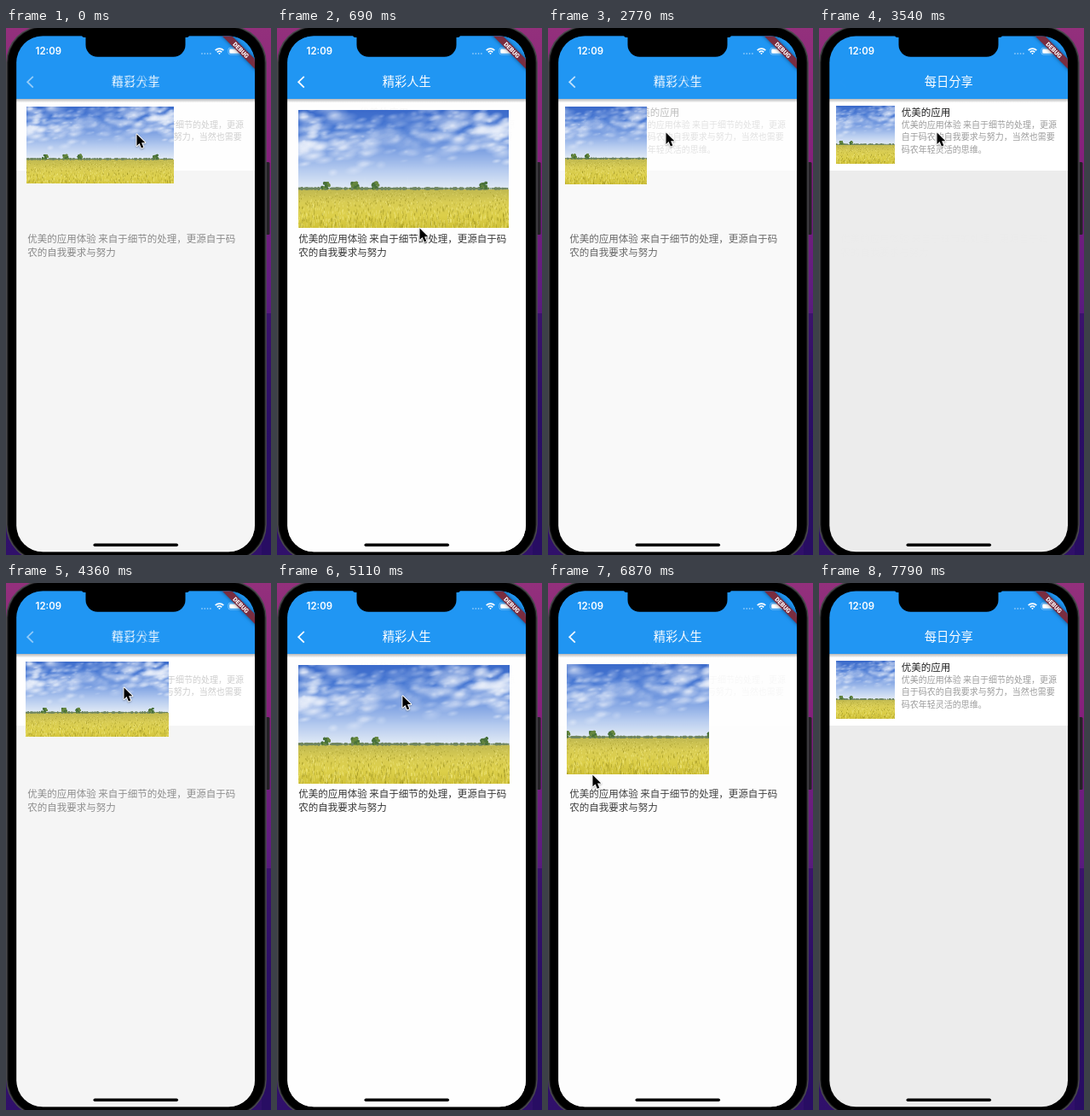
Write an HTML page with a canvas that moves like this. It is 311 by 617 pixels and loops after 8 s.

```html
<!DOCTYPE html>
<html lang="zh-CN">
<head>
<meta charset="utf-8">
<title>每日分享</title>
<style>
html, body { margin: 0; width: 100%; height: 100%; overflow: hidden; background: #000; }
canvas { display: block; width: 311px; height: 617px; }
</style>
</head>
<body>
<canvas id="stage"></canvas>
<script>
const W = 311, H = 617, LOOP = 8000;
const SCALE = window.devicePixelRatio || 1;
const FONT = '"Noto Sans CJK SC", "Noto Sans CJK", sans-serif';
const PHOTO = { w: 252, h: 143 };

// Hero bounds as corner points: top-left, bottom-right.
const THUMB = [[19.5, 90.6], [88.5, 159]];
const LARGE = [[25.3, 96], [277, 238.8]];

// Start and duration of each route change; opening and closing alternate.
const FLIGHTS = [[-600, 1660], [1736, 1900], [3780, 1660], [6420, 1400]];

// Pointer stops: arrival time, x, y. Every move takes TRAVEL ms.
const TRAVEL = 650;
const STOPS = [
  [0, 153, 124], [690, 167, 234], [1800, 38, 72], [2770, 138, 122],
  [5600, 196, 186], [6500, 38, 72], [7300, 90, 640]
];

const clamp = v => Math.min(1, Math.max(0, v));

function random(seed) {
  return () => (seed = (seed * 16807) % 2147483647) / 2147483647;
}

function layer(w, h, k, draw) {
  const canvas = document.createElement('canvas');
  canvas.width = Math.round(w * k);
  canvas.height = Math.round(h * k);
  const g = canvas.getContext('2d');
  g.scale(k, k);
  draw(g);
  return canvas;
}

function box(g, x, y, w, h, r, fill) {
  g.beginPath();
  g.roundRect(x, y, w, h, r);
  g.fillStyle = fill;
  g.fill();
}

function dot(g, x, y, r, fill) {
  g.beginPath();
  g.arc(x, y, r, 0, 7);
  g.fillStyle = fill;
  g.fill();
}

function text(g, str, x, y, size, fill, align = 'left', weight = 400, font = FONT) {
  g.font = `${weight} ${size}px ${font}`;
  g.textAlign = align;
  g.fillStyle = fill;
  g.fillText(str, x, y);
}

// Vertical gradient with evenly spaced colours.
function gradient(g, y0, y1, ...colors) {
  const fill = g.createLinearGradient(0, y0, 0, y1);
  colors.forEach((color, i) => fill.addColorStop(i / (colors.length - 1), color));
  return fill;
}

function puff(g, x, y, r, stretch, alpha) {
  const fill = g.createRadialGradient(0, 0, 0, 0, 0, r);
  fill.addColorStop(0, `rgba(244,247,253,${alpha})`);
  fill.addColorStop(1, 'rgba(244,247,253,0)');
  g.save();
  g.translate(x, y);
  g.rotate(-0.18);
  g.scale(stretch, 1);
  g.fillStyle = fill;
  g.fillRect(-r, -r, r * 2, r * 2);
  g.restore();
}

function drawPhoto(g) {
  const { w, h } = PHOTO, rnd = random(41), horizon = 96;
  g.fillStyle = gradient(g, 0, horizon, '#3b6aca', '#4a7ad4', '#7ca0e2', '#b4caef', '#e4ecf6');
  g.fillRect(0, 0, w, horizon);

  // Clouds gather in a wavy band, denser towards both sides.
  for (let i = 0; i < 260; i++) {
    const x = rnd() * w, spread = rnd() + rnd() + rnd() - 1.5;
    const y = 32 + 8 * Math.sin(x / 38) + spread * 32;
    const side = Math.abs(2 * x / w - 1);
    puff(g, x, y, 2 + rnd() * 6, 1.3 + rnd() * 1.7, 0.18 + 0.4 * side);
  }

  g.fillStyle = gradient(g, horizon, h, '#c0b951', '#d9cd54', '#dccf4a', '#cfc138');
  g.fillRect(0, horizon, w, h - horizon);
  for (let i = 0; i < 1300; i++) {
    const depth = rnd();
    g.fillStyle = rnd() < 0.5 ? 'rgba(246,237,140,.5)' : 'rgba(140,132,24,.42)';
    g.fillRect(rnd() * w, horizon + 2 + depth * 44, 0.8, 1 + depth * 4);
  }

  for (let x = 0; x < w; x += 2) dot(g, x, 95, 0.8 + rnd() * 1.3, '#6f8560');
  for (const x of [33, 67, 92, 222]) {
    for (let i = 0; i < 16; i++) {
      const dy = rnd() * 7, green = rnd() < 0.5 ? '#48703a' : '#66873f';
      dot(g, x + (rnd() - 0.5) * (5 + dy), 88 + dy, 1 + rnd() * 1.3, green);
    }
  }
}

function appBar(g, title) {
  g.fillStyle = gradient(g, 83, 87.5, 'rgba(0,0,0,.28)', 'rgba(0,0,0,0)');
  g.fillRect(0, 83, W, 4.5);
  g.fillStyle = '#2196f3';
  g.fillRect(0, 0, W, 83);
  text(g, title, 152.3, 68.2, 14.3, '#fff', 'center');
}

function drawList(g) {
  g.fillStyle = '#ececec';
  g.fillRect(0, 0, W, H);
  g.fillStyle = '#fff';
  g.fillRect(0, 83, W, 84);
  text(g, '优美的应用', 96.8, 102.6, 11.5, '#222');
  ['优美的应用体验 来自于细节的处理，更源',
    '自于码农的自我要求与努力，当然也需要',
    '码农年轻灵活的思维。'
  ].forEach((line, i) => text(g, line, 96.8, 117.2 + i * 14.2, 10, '#9b9b9b'));
  appBar(g, '每日分享');
}

function drawDetail(g) {
  g.fillStyle = '#fefefe';
  g.fillRect(0, 0, W, H);
  ['优美的应用体验 来自于细节的处理，更源自于码', '农的自我要求与努力']
    .forEach((line, i) => text(g, line, 25.2, 251 + i * 15.8, 11.5, '#333'));
  appBar(g, '精彩人生');
  g.beginPath();
  g.moveTo(31.8, 56.8);
  g.lineTo(25.2, 63.2);
  g.lineTo(31.8, 69.6);
  g.strokeStyle = '#fff';
  g.lineWidth = 1.8;
  g.stroke();
}

function drawBanner(g) {
  g.save();
  g.translate(292, 9.5);
  g.rotate(Math.PI / 4);
  g.shadowColor = 'rgba(0,0,0,.5)';
  g.shadowBlur = 4 * SCALE;
  g.fillStyle = '#792d40';
  g.fillRect(-34, 18.9, 68, 8.1);
  g.shadowColor = 'transparent';
  text(g, 'DEBUG', 0, 25.6, 7.2, '#fff', 'center', 900, 'Roboto, sans-serif');
  g.restore();
}

function drawStatus(g) {
  text(g, '12:09', 34.6, 31.3, 11.4, '#fff', 'left', 600, 'Inter, sans-serif');
  for (let i = 0; i < 4; i++) dot(g, 230 + i * 3.3, 30, 0.9, 'rgba(255,255,255,.45)');
  g.strokeStyle = '#fff';
  g.lineWidth = 1.7;
  for (const r of [1, 3.8, 6.8]) {
    g.beginPath();
    g.arc(250.5, 31, r, -Math.PI * 0.75, -Math.PI * 0.25);
    g.stroke();
  }
  g.beginPath();
  g.roundRect(260.9, 23.2, 15.4, 7.8, 2.3);
  g.strokeStyle = 'rgba(255,255,255,.5)';
  g.lineWidth = 0.8;
  g.stroke();
  box(g, 262.2, 24.5, 12.8, 5.2, 1.2, '#fff');
}

function drawPhone(g) {
  g.fillStyle = gradient(g, 0, H, '#93307c', '#84207c', '#5f1c80', '#34126e', '#30106a');
  g.fillRect(0, 0, W, H);
  g.fillStyle = 'rgba(32,10,92,.5)';
  g.fillRect(300, 334, 11, H);
  box(g, 304, 157, 5.5, 85, 1.5, '#242126');
  box(g, 0, -2.5, 305.8, 627, 43, '#4a494d');
  box(g, 1.4, -1.3, 303, 624.6, 42, '#19191b');
  box(g, 2.6, -0.5, 300.6, 623, 41, '#000');
}

function drawNotch(g) {
  box(g, 93.5, 4, 117, 29.8, [0, 0, 14, 14], '#000');
  box(g, 89, 4, 126, 7, [0, 0, 3, 3], '#000');
}

// Material "fast out, slow in" easing: cubic-bezier(.4, 0, .2, 1).
function ease(x) {
  let lo = 0, hi = 1;
  for (let i = 0; i < 24; i++) {
    const u = (lo + hi) / 2, v = 1 - u;
    if (1.2 * u * v * v + 0.6 * u * u * v + u * u * u < x) lo = u;
    else hi = u;
  }
  return lo * lo * (3 - 2 * lo);
}

// Circular arc from a to b, leaving a horizontally.
function arc(a, b, p) {
  const dx = b[0] - a[0], dy = b[1] - a[1], d = Math.hypot(dx, dy);
  const r = d * d / (2 * Math.abs(dy));
  const angle = 2 * Math.asin(d / (2 * r)) * p;
  return [
    a[0] + Math.sign(dx) * r * Math.sin(angle),
    a[1] + Math.sign(dy) * r * (1 - Math.cos(angle))
  ];
}

function routeAt(t) {
  const i = FLIGHTS.findLastIndex(([start]) => start <= t);
  const [start, duration] = FLIGHTS[i];
  const opening = i % 2 === 0, s = clamp((t - start) / duration);
  const [from, to] = opening ? [THUMB, LARGE] : [LARGE, THUMB];
  return {
    alpha: ease(opening ? s : 1 - s),
    hero: from.map((corner, n) => arc(corner, to[n], ease(s)))
  };
}

function pointerAt(t) {
  let [, x, y] = STOPS[0];
  for (const [arrival, nx, ny] of STOPS) {
    const u = clamp((t - arrival) / TRAVEL + 1), p = u * u * (3 - 2 * u);
    x += (nx - x) * p;
    y += (ny - y) * p;
  }
  return [x, y];
}

function drawHero(g, [[x0, y0], [x1, y1]]) {
  const w = x1 - x0, h = y1 - y0;
  const fit = Math.max(w / PHOTO.w, h / PHOTO.h);
  const sw = w / fit, sh = h / fit, k = photo.width / PHOTO.w;
  g.drawImage(photo, (PHOTO.w - sw) / 2 * k, (PHOTO.h - sh) / 2 * k, sw * k, sh * k, x0, y0, w, h);
}

function drawPointer(g, [x, y]) {
  g.save();
  g.translate(x, y);
  g.shadowColor = 'rgba(0,0,0,.3)';
  g.shadowBlur = 2 * SCALE;
  g.shadowOffsetY = SCALE;
  g.strokeStyle = '#fff';
  g.lineWidth = 2;
  g.lineJoin = 'round';
  const shape = new Path2D('M.5 .5V14l3.1-2.9 2.3 5.3 2.4-1-2.2-5.2h4.2z');
  g.stroke(shape);
  g.shadowColor = 'transparent';
  g.fill(shape);
  g.restore();
}

const stage = document.getElementById('stage');
stage.width = Math.round(W * SCALE);
stage.height = Math.round(H * SCALE);
const ctx = stage.getContext('2d');
ctx.scale(SCALE, SCALE);

const photo = layer(PHOTO.w, PHOTO.h, 2, drawPhoto);
const phone = layer(W, H, SCALE, drawPhone);
const list = layer(W, H, SCALE, drawList);
const detail = layer(W, H, SCALE, drawDetail);
const chrome = layer(W, H, SCALE, g => {
  drawStatus(g);
  drawBanner(g);
  box(g, 102.5, 603.6, 99.5, 3.5, 1.75, '#000');
});

function render(t) {
  const { alpha, hero } = routeAt(t);
  ctx.drawImage(phone, 0, 0, W, H);
  ctx.save();
  ctx.beginPath();
  ctx.roundRect(12.3, 9.5, 279.7, 603.8, 31);
  ctx.clip();
  ctx.drawImage(list, 0, 0, W, H);
  ctx.globalAlpha = alpha;
  ctx.drawImage(detail, 0, 0, W, H);
  ctx.globalAlpha = 1;
  drawHero(ctx, hero);
  ctx.drawImage(chrome, 0, 0, W, H);
  ctx.restore();
  drawNotch(ctx);
  drawPointer(ctx, pointerAt(t));
}

const began = performance.now();
function loop() {
  render((performance.now() - began) % LOOP);
  requestAnimationFrame(loop);
}
loop();
</script>
</body>
</html>
```
